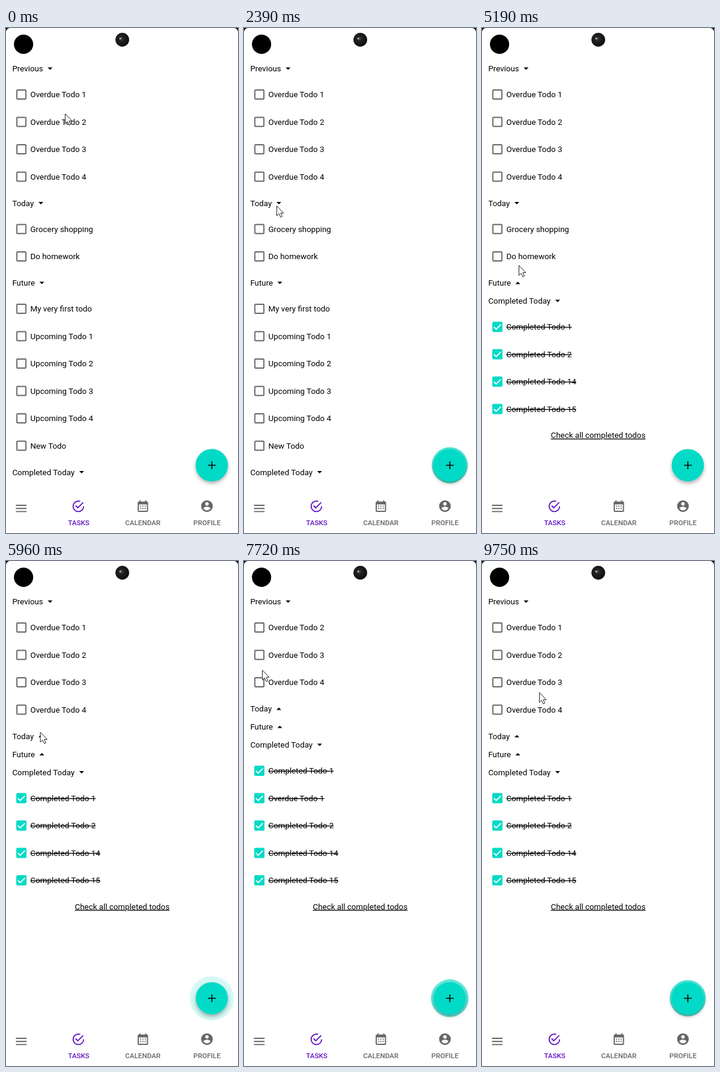
Recreate the animation shown at these times as an HTML page. Size 386 by 839 pixels, loop 9820 ms.

```html
<!DOCTYPE html>
<html lang="en">
<head>
<meta charset="utf-8">
<title>Todo list</title>
<style>
html, body { margin: 0; width: 100%; height: 100%; overflow: hidden; background: #fff; }
svg { display: block; width: 386px; height: 839px; font: 13.35px Roboto, sans-serif; }
.box { fill: none; stroke: #666; stroke-width: 1.9; }
.full { fill: #03dac6; }
.tick { fill: none; stroke: #fff; stroke-width: 1.9; }
.done { text-decoration: line-through; }
.link { text-decoration: underline; text-anchor: middle; }
.tab { fill: #666; }
.tab text { font-size: 11.6px; font-weight: 500; text-anchor: middle; }
.active { fill: #6418c3; }
</style>
</head>
<body>
<svg viewBox="0 0 386 839">
  <defs>
    <clipPath id="view"><rect width="386" height="772"/></clipPath>
    <filter id="shade" x="-30%" y="-30%" width="160%" height="170%">
      <feDropShadow dx="0" dy="3.5" stdDeviation="3" flood-opacity=".32"/>
    </filter>
    <radialGradient id="lens" cx=".42" cy=".42">
      <stop offset="0" stop-color="#555"/><stop offset=".35" stop-color="#222"/><stop offset="1" stop-color="#111"/>
    </radialGradient>
  </defs>
  <rect width="386" height="839" fill="#fff"/>
  <path d="M0 0H6Q1 1 0 6ZM386 0H380Q385 1 386 6Z"/>
  <circle cx="29.2" cy="27" r="16"/>
  <circle cx="193.5" cy="19.5" r="11.4" fill="url(#lens)"/>
  <circle cx="190" cy="17.5" r="1.3" fill="#ccc"/>
  <g id="list" clip-path="url(#view)"></g>

  <circle id="ring" cx="342.4" cy="726.4" fill="#03dac6"/>
  <circle cx="342.4" cy="726.4" r="26.7" fill="#03dac6" filter="url(#shade)"/>
  <path d="M336 726.5H349M342.5 720V733" stroke="#000" stroke-width="1.7"/>

  <path d="M16.5 793H34.2M16.5 798.2H34.2M16.5 803.4H34.2" stroke="#666" stroke-width="1.9"/>
  <g class="tab active">
    <path transform="translate(108.8 783) scale(.97)" d="M20 12A8 8 0 1 1 12 4C12.76 4 13.5 4.11 14.2 4.31L15.77 2.74C14.61 2.26 13.34 2 12 2A10 10 0 1 0 22 12M7.91 10.08L6.5 11.5L11 16L21 6L19.59 4.58L11 13.17Z"/>
    <text x="121" y="826">TASKS</text>
  </g>
  <g class="tab">
    <path transform="translate(216.2 783.8) scale(.96)" fill-rule="evenodd" d="M5 3H6V1H8V3H16V1H18V3H19A2 2 0 0 1 21 5V19A2 2 0 0 1 19 21H5A2 2 0 0 1 3 19V5A2 2 0 0 1 5 3ZM5 8V19H19V8ZM7 10H9V12H7ZM11 10H13V12H11ZM15 10H17V12H15ZM7 14H9V16H7ZM11 14H13V16H11ZM15 14H17V16H15Z"/>
    <text x="227.7" y="826">CALENDAR</text>
  </g>
  <g class="tab">
    <path transform="translate(322.7 782.8) scale(.97)" fill-rule="evenodd" d="M12 19.2C9.5 19.2 7.29 17.92 6 16C6.03 14 10 12.9 12 12.9S17.97 14 18 16C16.71 17.92 14.5 19.2 12 19.2M12 5A3 3 0 1 1 12 11A3 3 0 1 1 12 5M12 2A10 10 0 1 0 12 22A10 10 0 1 0 12 2Z"/>
    <text x="334.4" y="826">PROFILE</text>
  </g>

  <circle id="press" fill="#ffeb00" fill-opacity=".62"/>
  <path id="cursor" d="M.5 .5V17L4.2 13.4L6.9 19.4L9.6 18.2L7 12.4H11.8Z" fill="#fff" stroke="#222"/>
</svg>
<script>
const LOOP = 9820, PULSE = 1050, ROW = 45.5, CHECK_AT = 6800;
const $ = id => document.getElementById(id);
const numbered = (name, ids) => ids.map(n => `${name} Todo ${n}`);

const todo = {
  past: numbered('Overdue', [1, 2, 3, 4]),
  today: ['Grocery shopping', 'Do homework'],
  future: ['My very first todo', ...numbered('Upcoming', [1, 2, 3, 4]), 'New Todo'],
  done: numbered('Completed', [1, 2, 14, 15])
};
const folded = { ...todo, today: [], future: [] };
const [first, ...rest] = todo.done;

// [start, lists shown from then on]
const states = [
  [0, todo],
  [630, { ...todo, past: [] }],
  [1470, todo],
  [2660, { ...todo, today: [] }],
  [3290, todo],
  [4480, { ...todo, future: [] }],
  [5680, folded],
  [CHECK_AT, { ...folded, past: todo.past.slice(0, 3), checking: true }],
  [6930, { ...folded, past: todo.past.slice(1), done: [first, todo.past[0], ...rest] }],
  [8960, folded]
];
const presses = [470, 1310, 2500, 3130, 4320, 5520, 6520, 8680];

// [time, x, y] of the pointer tip
const path = [
  [0, 98, 142], [420, 71, 76], [1600, 71, 76], [2040, 98, 191], [2200, 98, 270],
  [2390, 54, 295], [2560, 57, 295], [3400, 57, 296], [3560, 68, 360], [3720, 60, 408],
  [3900, 59, 428], [4800, 59, 428], [5190, 61, 394], [5330, 68, 355], [5500, 58, 294],
  [5900, 58, 294], [6240, 36, 136], [6420, 31, 117], [6870, 31, 112], [7350, 31, 112],
  [8350, 28, 390], [8770, 28, 395], [9120, 28, 395], [9400, 76, 290], [9750, 95, 218], [9820, 96, 212]
];

function checkbox(y, on, growing) {
  if (!on) return `<rect class="box" x="18.1" y="${y - 7.5}" width="15" height="15" rx="1"/>`;
  return `<g transform="translate(25.6 ${y})"><rect class="full" x="-8.5" y="-8.5" width="17" height="17" rx="2"/>` +
    `<path class="tick" ${growing ? 'id="grow"' : ''} d="M-5.8 .2L-2 4L5.9 -3.9"/></g>`;
}

function section(title, caretX, y, items, done, checking) {
  const tip = items.length ? -2 : 2;
  let out = `<text x="10.4" y="${y + 4.7}">${title}</text>` +
    `<path d="M${caretX - 4} ${y + tip}h8l-4 ${-2 * tip}z"/>`;
  items.forEach((label, i) => {
    const cy = y + 43.1 + ROW * i, growing = checking && i === 0;
    out += checkbox(cy, done || growing, growing) +
      `<text class="${done ? 'done' : ''}" x="40.5" y="${cy + 4.7}">${label}</text>`;
  });
  return out;
}

const height = n => 30 + (n ? n * ROW + 11.5 : 0);

function drawList(s) {
  let y = 67.4, out = '';
  const add = (title, caretX, items, done, checking) => {
    out += section(title, caretX, y, items, done, checking);
    y += height(items.length);
  };
  add('Previous', 73.4, s.past, false, s.checking);
  add('Today', 58, s.today);
  add('Future', 59.6, s.future);
  add('Completed Today', 125.8, s.done, true);
  if (s.checking) y += ROW;
  $('list').innerHTML = out + `<text class="link" x="193.3" y="${y + 4.2}">Check all completed todos</text>`;
}

function slope(i, k) {
  const a = path[i - 1], b = path[i], c = path[i + 1];
  if (!a || !c || (b[k] - a[k]) * (c[k] - b[k]) <= 0) return 0;
  return (c[k] - a[k]) / (c[0] - a[0]);
}

// Cubic through the points that comes to rest at turning points
function along(t, k) {
  const i = Math.max(0, path.findIndex(p => p[0] > t) - 1);
  const a = path[i], b = path[i + 1], d = b[0] - a[0], u = (t - a[0]) / d, v = 1 - u;
  return a[k] * v * v * (1 + 2 * u) + b[k] * u * u * (3 - 2 * u) +
    d * u * v * (slope(i, k) * v - slope(i + 1, k) * u);
}

let shown, start;
function draw(t) {
  const state = states.filter(s => s[0] <= t).pop()[1];
  if (state !== shown) drawList(shown = state);
  const grow = $('grow');
  if (grow) grow.setAttribute('transform', `scale(${((t - CHECK_AT) / 150) ** 2})`);

  const u = (t + 73) % PULSE / PULSE, p = u * u * (3 - 2 * u);
  $('ring').setAttribute('r', 26.7 + 12 * p);
  $('ring').setAttribute('fill-opacity', 1 - p);

  const x = along(t, 1), y = along(t, 2);
  $('cursor').setAttribute('transform', `translate(${x} ${y})`);
  const hit = presses.find(at => t >= at && t < at + 280);
  const q = hit === undefined ? 0 : (t - hit) / 280;
  const press = $('press');
  press.setAttribute('cx', x);
  press.setAttribute('cy', y);
  press.setAttribute('r', q ? 8 + 12 * q : 0);
  press.setAttribute('opacity', Math.min(1, 1.5 * (1 - q)));
}

function tick(now) {
  start ??= now;
  draw((now - start) % LOOP);
  requestAnimationFrame(tick);
}
draw(0);
requestAnimationFrame(tick);
</script>
</body>
</html>
```
